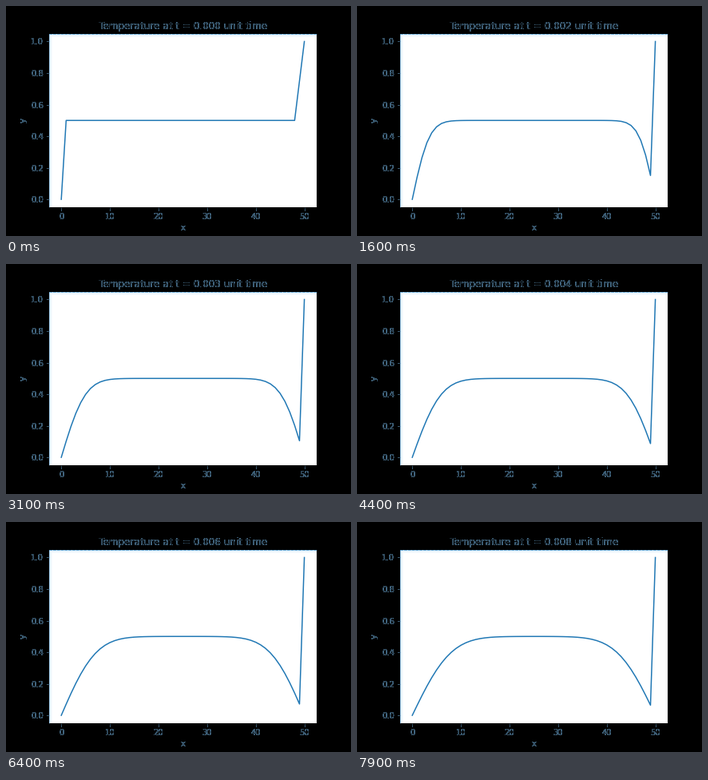
Write a matplotlib script that moves like this. It is 432 px wide and 288 px high and loops after 8000 ms.

```python
import numpy as np
import matplotlib.pyplot as plt
from matplotlib.animation import FuncAnimation
from matplotlib.patches import Rectangle

FRAMES, INTERVAL = 80, 100
CELLS, DT = 50, 1e-4
R = DT * CELLS**2
FRINGE = np.array([66, 102, 128]) / 255
SHADE = np.array([0.88, 0.94, 0.98])


def solve():
    """Implicit heat equation on the inner points, with cold walls."""
    n = CELLS - 1
    step = np.linalg.inv((1 + 2 * R) * np.eye(n)
                         - R * (np.eye(n, k=1) + np.eye(n, k=-1)))
    rows = np.zeros((FRAMES, CELLS + 1))
    rows[:, -1] = 1
    rows[0, 1:-1] = 0.5
    rows[0, -2] = 0.75
    for k in range(1, FRAMES):
        rows[k, 1:-1] = step @ rows[k - 1, 1:-1]
    return rows


def fringe(img, dpi):
    """Keep only the antialiased rim of black ink, tinted blue."""
    cover = img[..., 3:]
    out = np.empty_like(img)
    out[..., :3] = FRINGE * 2 * np.sqrt(np.clip(cover * (1 - cover), 0, 1))
    out[..., 3:] = cover > 0.02
    return out, 0, 0


def inner_shade(ax, depth=4):
    """Fade from a pale blue at the left and top edges to white."""
    box = ax.bbox
    ax.set_facecolor(SHADE)
    for d in range(1, depth + 1):
        tone = SHADE + (1 - SHADE) * d / depth
        ax.add_artist(Rectangle((box.x0 + d, box.y0), box.width - d,
                                box.height - d, transform=None,
                                color=tone, lw=0, zorder=0.5))


plt.rcParams.update({"font.family": "DejaVu Sans", "font.size": 10})
fig = plt.figure(figsize=(6, 4), dpi=72, facecolor="black")
ax = fig.add_axes([0.125, 0.125, 0.775, 0.755])
heat = solve()
line, = ax.plot(np.arange(CELLS + 1), heat[0], color="#1f77b4", lw=1.5)
ax.set(xlim=(-2.5, 52.5), ylim=(-0.05, 1.05), xlabel="x", ylabel="y")
title = ax.set_title("")
inner_shade(ax)
ax.spines["left"].set_color("#8fc1e6")
ax.spines["top"].set(color="#5ba4d6", linestyle=(0, (4, 2)))
for part in (title, ax.xaxis, ax.yaxis):
    part.set_agg_filter(fringe)


def update(k):
    line.set_ydata(heat[k])
    title.set_text(f"Temperature at t = {k * DT:.3f} unit time")
    return line, title


anim = FuncAnimation(fig, update, frames=FRAMES, interval=INTERVAL,
                     repeat=True, repeat_delay=0)
plt.show()
```
